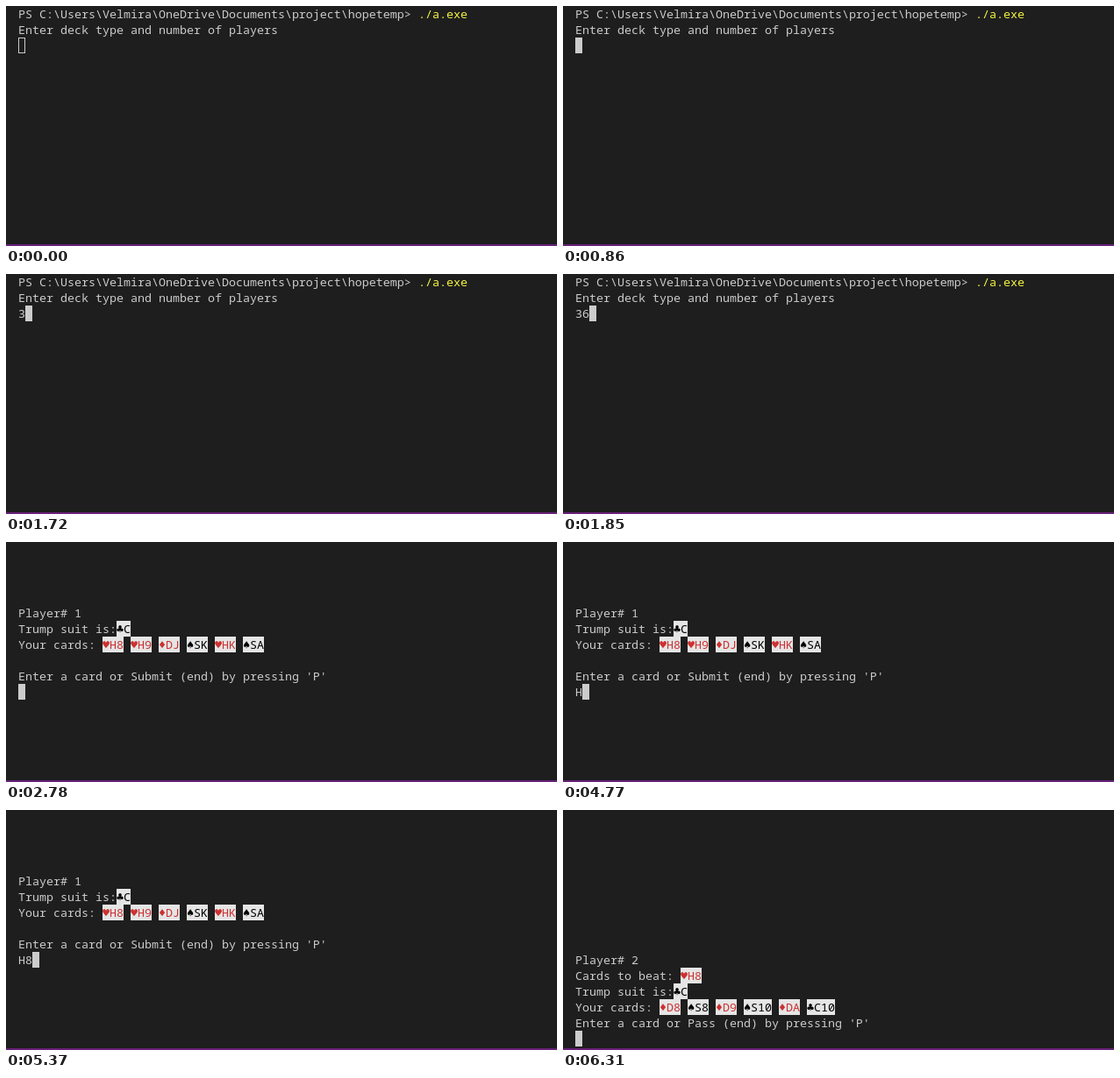
Animation of 628x274 px, one loop 8000 ms. Source, as an HTML page:

```html
<!DOCTYPE html>
<html lang="en">
<head>
<meta charset="utf-8">
<title>Card game in a terminal</title>
<style>
  html, body { margin: 0; width: 100%; height: 100%; overflow: hidden; background: #1e1e1e; }
  svg { display: block; }
  text {
    font: 13.3333px "Noto Sans Mono", "DejaVu Sans Mono", monospace;
    font-variant-ligatures: none;
    white-space: pre;
  }
  .suit { font-family: "DejaVu Sans Mono", monospace; }
</style>
</head>
<body>
<svg width="628" height="274" viewBox="0 0 628 274">
  <rect width="628" height="274" fill="#1e1e1e"/>
  <g id="screen"></g>
  <rect id="cursor" stroke="#ccc"/>
  <rect y="272" width="628" height="2" fill="#68217a"/>
</svg>
<script>
const NS = 'http://www.w3.org/2000/svg';
const LOOP = 8000, LEFT = 14, CELL = 8, LINE = 18, BASE = 14;
const FG = '#cccccc', YELLOW = '#f5f543', RED = '#cd3131', BLACK = '#000000', PAPER = '#e5e5e5';
const SUITS = { H: '♥', D: '♦', S: '♠', C: '♣' };
const screen = document.getElementById('screen');
const cursor = document.getElementById('cursor');

function add(parent, tag, attrs, content) {
  const el = document.createElementNS(NS, tag);
  for (const key in attrs) el.setAttribute(key, attrs[key]);
  if (content) el.textContent = content;
  parent.appendChild(el);
  return el;
}

function print(parent, col, row, str, fill = FG, cls = '') {
  return add(parent, 'text', { x: LEFT + col * CELL, y: row * LINE + BASE, fill, class: cls }, str);
}

function cards(parent, col, row, list) {
  for (const card of list.split(' ')) {
    const fill = 'HD'.includes(card[0]) ? RED : BLACK;
    const cells = card.length + 1;
    add(parent, 'rect', { x: LEFT + col * CELL, y: row * LINE, width: cells * CELL, height: LINE, fill: PAPER });
    print(parent, col, row, SUITS[card[0]], fill, 'suit');
    print(parent, col + 1, row, card, fill);
    col += cells + 1;
  }
}

// Each page: start time, cursor row, keystrokes [time, typed text], drawing
const pages = [
  {
    at: 0, row: 2, keys: [[1720, '3'], [1850, '36'], [1980, '36 '], [2110, '36 2']],
    draw(g) {
      const prompt = 'PS C:\\Users\\Velmira\\OneDrive\\Documents\\project\\hopetemp> ';
      print(g, 0, 0, prompt);
      print(g, prompt.length, 0, './a.exe', YELLOW);
      print(g, 0, 1, 'Enter deck type and number of players');
    }
  },
  {
    at: 2780, row: 9, keys: [[4770, 'H'], [5370, 'H8']],
    draw(g) {
      print(g, 0, 4, 'Player# 1');
      print(g, 0, 5, 'Trump suit is:');
      cards(g, 14, 5, 'C');
      print(g, 0, 6, 'Your cards:');
      cards(g, 12, 6, 'H8 H9 DJ SK HK SA');
      print(g, 0, 8, "Enter a card or Submit (end) by pressing 'P'");
    }
  },
  {
    at: 6310, row: 14, keys: [],
    draw(g) {
      print(g, 0, 9, 'Player# 2');
      print(g, 0, 10, 'Cards to beat:');
      cards(g, 15, 10, 'H8');
      print(g, 0, 11, 'Trump suit is:');
      cards(g, 14, 11, 'C');
      print(g, 0, 12, 'Your cards:');
      cards(g, 12, 12, 'D8 S8 D9 S10 DA C10');
      print(g, 0, 13, "Enter a card or Pass (end) by pressing 'P'");
    }
  }
];

for (const page of pages) {
  page.group = add(screen, 'g', {});
  page.draw(page.group);
  page.input = print(page.group, 0, page.row, '');
}

cursor.setAttribute('width', CELL - 1);
cursor.setAttribute('height', LINE - 1);

function render(t) {
  const page = pages.filter(p => p.at <= t).pop();
  const key = page.keys.filter(k => k[0] <= t).pop();
  const typed = key ? key[1] : '';
  for (const p of pages) p.group.setAttribute('display', p === page ? 'inline' : 'none');
  page.input.textContent = typed;
  cursor.setAttribute('x', LEFT + typed.length * CELL + 0.5);
  cursor.setAttribute('y', page.row * LINE + 0.5);
  cursor.setAttribute('fill', t < 860 ? 'none' : FG);
}

function tick() {
  render(performance.now() % LOOP);
  requestAnimationFrame(tick);
}
tick();
</script>
</body>
</html>
```
